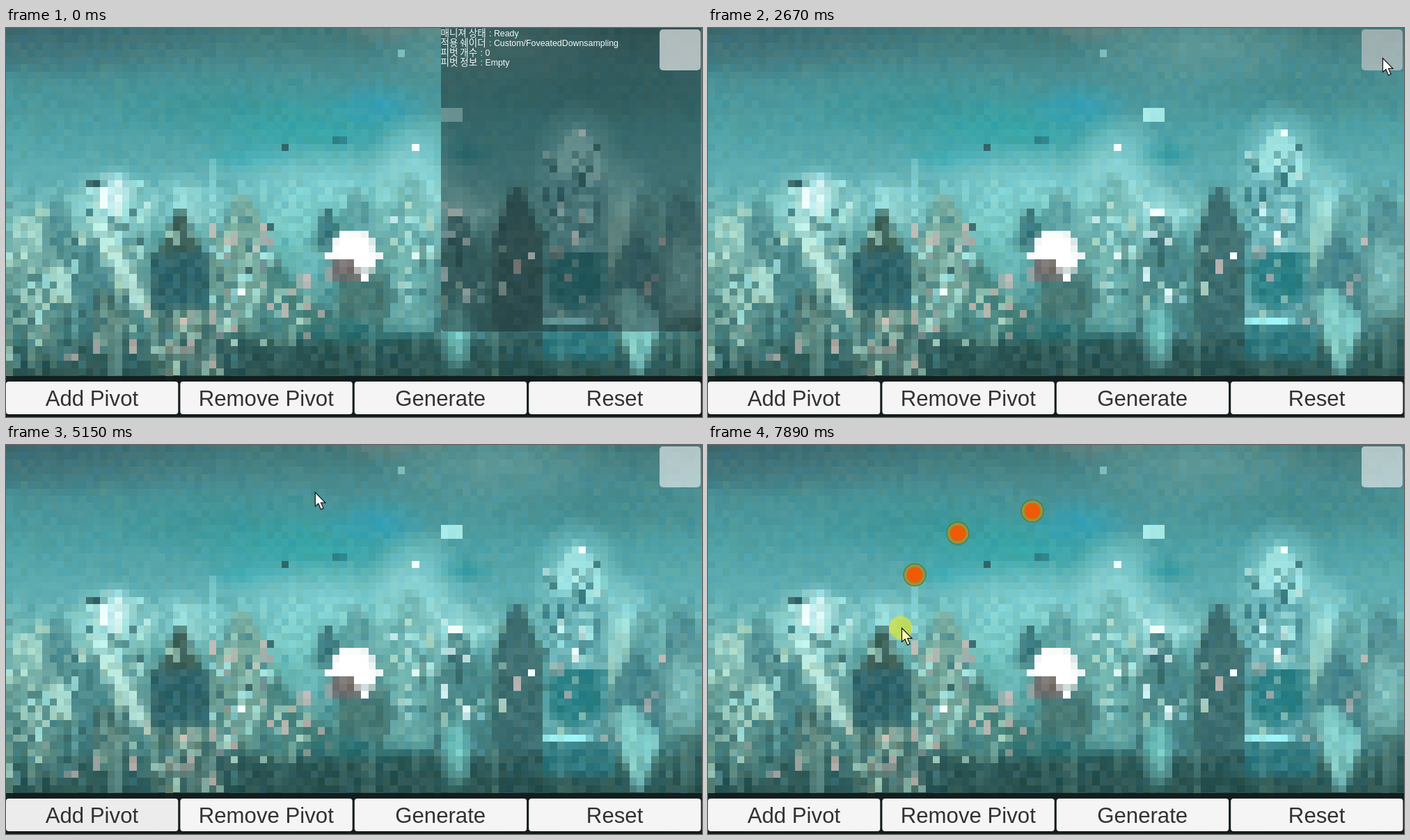
Animation, 1000 px wide and 560 px high, one loop 8000 ms. Source, as an HTML page with a canvas:

```html
<!DOCTYPE html>
<html lang="ko">
<head>
<meta charset="utf-8">
<style>
  html, body { margin: 0; width: 100%; height: 100%; overflow: hidden; background: #161d1e; }
  canvas { display: block; width: 1000px; height: 560px; }
</style>
</head>
<body>
<canvas id="stage" width="1000" height="560"></canvas>
<script>
const LOOP = 8000, CLICK = 140, CELL = 1000 / 96;
const g = document.getElementById('stage').getContext('2d');
const LATIN = '"Liberation Sans", Arial, sans-serif';

let seed = 11;
const rnd = (from = 0, to = 1) => {
  seed = (seed * 16807) % 2147483647;
  return from + (to - from) * seed / 2147483647;
};
const pick = list => list[Math.floor(rnd(0, list.length))];

// The city is painted in stage units on a 96 x 54 grid, then enlarged unsmoothed.
function paintCity() {
  const grid = document.createElement('canvas');
  grid.width = 96;
  grid.height = 54;
  const c = grid.getContext('2d', { willReadFrequently: true });
  c.scale(1 / CELL, 1 / CELL);

  const white = '#f2fffd', ice = '#a5e8e6', mint = '#acd8c6', pink = '#c8b9b4', aqua = '#38a8b0',
        slate = '#48868a', dark = '#38686a', night = '#2f5a5a', teal = '#308488';

  const fill = (color, alpha) => {
    c.globalAlpha = alpha;
    c.fillStyle = color;
  };
  const box = (x, y, w, h, color, alpha = 1) => {
    fill(color, alpha);
    c.fillRect(x, y, w, h);
  };
  const poly = (color, alpha, ...points) => {
    fill(color, alpha);
    c.beginPath();
    points.forEach(([x, y]) => c.lineTo(x, y));
    c.fill();
  };
  // A block that narrows towards its top
  const spire = (x, top, width, bottom, color, alpha = .95) => {
    const w = width / 2, shoulder = top + Math.min(width, (bottom - top) / 2);
    poly(color, alpha, [x - w, bottom], [x - w, shoulder], [x - w / 5, top], [x + w / 5, top], [x + w, shoulder], [x + w, bottom]);
  };
  const glow = (x, y, rx, ry, color, alpha = .8) => {
    const f = c.createRadialGradient(0, 0, 0, 0, 0, 1);
    f.addColorStop(0, color);
    f.addColorStop(.5, color + '8c');
    f.addColorStop(1, color + '00');
    c.save();
    c.translate(x, y);
    c.scale(rx, ry);
    fill(f, alpha);
    c.fillRect(-1, -1, 2, 2);
    c.restore();
  };
  const cells = (x, y, color, w = 1, h = 1, alpha = 1) =>
    box(Math.floor(x / CELL) * CELL, Math.floor(y / CELL) * CELL, w * CELL, h * CELL, color, alpha);
  const speckle = (n, x, y, w, h, ...colors) => {
    while (n--) cells(rnd(x, x + w), rnd(y, y + h), pick(colors), 1, pick([1, 1, 2]), rnd(.35, .9));
  };

  // Sky
  const sky = c.createLinearGradient(0, 0, 0, 560);
  ['#417779', '#4a9094', '#4ea0a4', '#5eadb1', '#72b7b4', '#609c98', '#457d79', '#2b5553', '#243f3e']
    .forEach((color, i, all) => sky.addColorStop(i / (all.length - 1), color));
  box(0, 0, 1000, 560, sky);
  glow(40, 0, 320, 80, '#38606a', .6);
  glow(550, 0, 90, 28, '#688078');
  glow(700, 25, 190, 70, '#68a4a2', .7);
  glow(880, 95, 190, 50, '#428484', .5);
  glow(330, 112, 230, 55, '#389698', .7);
  glow(440, 150, 180, 55, '#30a8aa');
  glow(535, 112, 75, 38, '#30a0b6', .9);
  glow(650, 180, 60, 24, '#30989e', .9);
  glow(340, 188, 70, 25, aqua);

  // Haze behind the skyline
  glow(150, 255, 75, 60, ice, .9);
  glow(155, 240, 32, 40, white, .7);
  glow(250, 258, 65, 55, ice, .9);
  glow(450, 235, 190, 75, '#8adcdc');
  glow(590, 205, 75, 90, ice, .7);
  glow(640, 270, 75, 60, ice);
  glow(822, 200, 70, 100, ice, .7);
  glow(890, 265, 45, 90, ice);
  glow(425, 330, 90, 105, '#7dd7d4');
  box(292, 187, 10, 85, ice, .4);

  // Random far blocks, then their mottled windows
  for (let x = 0; x < 1000; x += rnd(22, 50))
    spire(x, rnd(235, 300), rnd(25, 60), 450, pick([slate, mint, slate, teal]), rnd(.15, .4));
  speckle(150, 0, 255, 205, 170, mint, ice, slate, dark, mint);
  speckle(25, 110, 215, 95, 60, ice, white, slate);

  // Left
  poly('#bfeedd', .75, [15, 270], [36, 270], [110, 380], [92, 400]);
  poly('#c8f4e8', .75, [115, 270], [140, 270], [210, 400], [185, 410]);
  spire(75, 250, 50, 340, slate, .6);
  spire(123, 310, 62, 440, slate, .9);
  box(125, 380, 38, 70, '#40655f', .8);
  spire(340, 240, 95, 440, '#78a898', .8);
  speckle(75, 295, 270, 95, 170, mint, ice, slate, pink, dark);
  spire(250, 262, 64, 400, '#3d625a', 1);
  box(208, 322, 83, 84, '#31666c');
  speckle(5, 230, 285, 45, 20, mint);
  box(208, 406, 100, 94, '#567f76', .6);
  speckle(45, 195, 405, 120, 90, mint, '#78917f', dark, pink);

  // Middle
  poly('#46847f', .85, [345, 450], [385, 325], [425, 385], [478, 415], [478, 455]);
  spire(462, 258, 32, 320, '#38757a');
  spire(505, 231, 42, 300, '#589b9c', .85);
  spire(580, 205, 75, 440, '#6fb4b0', .75);
  box(478, 350, 73, 70, '#4a7c78', .95);
  spire(652, 272, 76, 450, '#4a878a', .9);
  speckle(60, 550, 245, 130, 150, ice, slate, mint, dark, white);
  speckle(22, 345, 350, 135, 85, mint, slate, pink);

  // Right
  spire(735, 230, 70, 470, '#3c6d6f', 1);
  spire(822, 142, 72, 235, ice, .8);
  box(771, 214, 93, 214, '#68b0b4', .9);
  speckle(50, 775, 170, 80, 140, ice, '#34747a', ice, slate, white);
  poly(teal, 1, [776, 322], [860, 322], [860, 385], [820, 405], [778, 390]);
  box(771, 417, 68, 11, '#a0f6f8');
  box(771, 428, 104, 47, '#307d84', .9);
  spire(917, 238, 40, 320, '#5ca2a4', .8);
  spire(905, 295, 82, 440, '#48868c');
  spire(972, 231, 52, 310, '#4b8a8e', .8);
  glow(975, 365, 40, 80, ice, .6);
  speckle(22, 695, 290, 250, 150, mint, slate, pink);

  // Ground and reflections
  box(310, 445, 460, 60, '#2a5250', .6);
  glow(510, 438, 110, 22, '#206a6e');
  glow(648, 440, 26, 65, '#7ddcd7', .9);
  poly('#8cdad6', .85, [868, 390], [895, 370], [940, 420], [916, 498], [905, 498]);
  glow(985, 450, 40, 50, night);
  for (let x = 0; x < 1000; x += CELL)
    box(x, rnd(370, 430), CELL, rnd(60, 130), pick([night, mint]), rnd(0, x < 340 ? .4 : .15));
  speckle(60, 0, 415, 440, 75, mint, slate, dark, pink);

  // White shape in the centre
  box(468, 333, 42, 30, '#747272');
  box(478, 292, 42, 42, '#fff');
  box(468, 303, 62, 22, '#fff');
  box(458, 323, 83, 10, '#fff');
  box(500, 333, 31, 16, '#fff');
  box(510, 349, 12, 16, '#fff');

  // Single lights and dark spots
  cells(567, 36, '#82beb9');
  cells(400, 172, dark);
  cells(472, 161, teal, 2);
  cells(118, 224, dark, 2);
  cells(630, 120, ice, 3, 2);
  cells(640, 266, white, 2);
  [[587, 172], [827, 151], [755, 328], [337, 380]].forEach(([x, y]) => cells(x, y, white));

  // Grain, stronger in the city than in the sky
  const img = c.getImageData(0, 0, 96, 54), d = img.data;
  for (let i = 0; i < d.length; i += 4) {
    if (d[i] > 235) continue;
    const size = i < 96 * 4 * 21 ? 4 : 11, light = rnd(-size, size), tint = rnd(-4, 4);
    d[i] += light + tint;
    d[i + 1] += light;
    d[i + 2] += light - tint;
  }
  c.putImageData(img, 0, 0);
  return grid;
}
const city = paintCity();

// Cursor stops: arrival, departure, x, y
const stops = [
  [1360, 1360, 826, 526], [2120, 2190, 916, 48], [2400, 2690, 969, 43], [2950, 3170, 200, 575],
  [3250, 4060, 122, 534], [4400, 4400, 422, 145], [4800, 4870, 449, 84], [5250, 5250, 442, 62],
  [5640, 5830, 467, 96], [6040, 6680, 360, 127], [7250, 7480, 298, 187], [7800, LOOP, 278, 263]
];
const pivots = [[5710, 466, 95], [6430, 359, 127], [7330, 297, 187], [7860, 277, 262]];
const labels = ['Add Pivot', 'Remove Pivot', 'Generate', 'Reset'];
const info = [
  ['매니져 상태', ': Ready', 694], ['적용 쉐이더', ': Custom/FoveatedDownsampling', 694],
  ['피벗 개수', ': 0', 681.5], ['피벗 정보', ': Empty', 681.5]
];

function roundBox(x, y, w, h, r, color) {
  g.fillStyle = color;
  g.beginPath();
  g.roundRect(x, y, w, h, r);
  g.fill();
}

function disc(x, y, r, color) {
  g.fillStyle = color;
  g.beginPath();
  g.arc(x, y, r, 0, 7);
  g.fill();
}

function text(label, x, y, font, color, align) {
  g.font = font;
  g.fillStyle = color;
  g.textAlign = align;
  g.fillText(label, x, y);
}

function drawPanel() {
  roundBox(625, -6, 373.5, 443, 5, 'rgba(22,28,28,.43)');
  info.forEach(([name, value, x], i) => {
    const y = 11.5 + i * 14.2;
    text(name, 624.5, y, '13.5px "Noto Sans CJK KR", "Noto Sans CJK", sans-serif', '#f4f7f7', 'left');
    text(value, x, y, '12.4px ' + LATIN, '#f4f7f7', 'left');
  });
}

function drawButtons(t) {
  g.fillStyle = 'rgba(20,27,28,.94)';
  g.fillRect(0, 501, 1000, 59);
  const addColor = t < 3580 || t >= 5850 ? '#f5f5f5' : t < 3720 ? '#c8c8c8' : '#ececec';
  labels.forEach((label, i) => {
    const x = i * 250.4;
    roundBox(x, 509, 247.3, 47, 4, i ? '#f5f5f5' : addColor);
    text(label, x + 123.4, 544, '31.2px ' + LATIN, '#323232', 'center');
  });
}

function drawPivot(age, x, y) {
  if (age < 0) return;
  if (age < CLICK) return disc(x, y + 1, 16.7, 'rgba(240,234,10,.54)');
  disc(x, y, 16.5, '#4f6b3c');
  disc(x, y, 15.5, '#92963e');
  disc(x, y, 11.3, '#ee5a08');
}

const arrow = new Path2D('M.5 .5V20.5L5 16.5L8.6 25L12.2 23.4L8.7 15.4H15Z');
function drawCursor(t, clicking) {
  const i = stops.findLastIndex(stop => stop[0] <= t);
  if (i < 0) return;
  const [, leave, x, y] = stops[i], [arrive, , nextX, nextY] = stops[i + 1] || stops[i];
  const k = t > leave ? (t - leave) / (arrive - leave) : 0;
  g.save();
  g.translate(x + (nextX - x) * k, y + (nextY - y) * k);
  g.fillStyle = clicking ? '#ffffb0' : '#fff';
  g.strokeStyle = '#111';
  g.lineWidth = 1.2;
  g.fill(arrow);
  g.stroke(arrow);
  g.restore();
}

function draw(t) {
  const open = t < 2600, hover = t >= 2390 && t < 2740;
  g.imageSmoothingEnabled = false;
  g.drawImage(city, 0, 0, 1000, 54 * CELL);
  if (open) drawPanel();
  roundBox(939, 2, 59, 59, 5, hover ? 'rgba(200,200,200,.68)' : open ? 'rgba(238,238,238,.68)' : 'rgba(243,243,243,.63)');
  drawButtons(t);
  pivots.forEach(([at, x, y]) => drawPivot(t - at, x, y));
  drawCursor(t, pivots.some(([at]) => t >= at && t < at + CLICK));
}

function frame(now) {
  draw(now % LOOP);
  requestAnimationFrame(frame);
}
requestAnimationFrame(frame);
</script>
</body>
</html>
```
